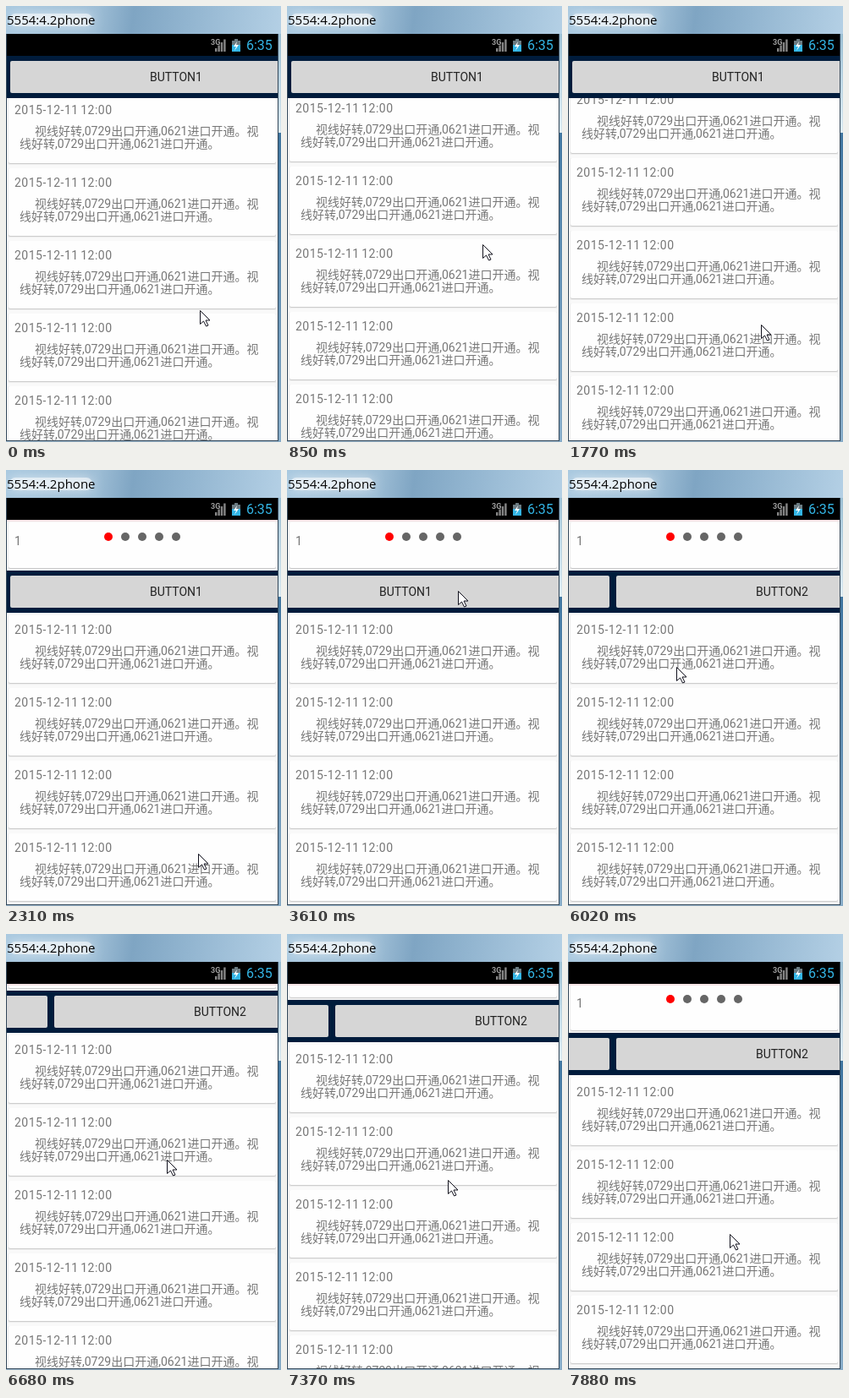
These frames come from a looping animation (325 px wide and 516 px high, 8 s). An HTML page with a canvas:

```html
<!DOCTYPE html>
<html lang="zh-CN">
<head>
<meta charset="utf-8">
<style>
  html, body { margin: 0; width: 100%; height: 100%; overflow: hidden; background: #9db8cc; }
  canvas { display: block; width: 325px; height: 516px; }
</style>
</head>
<body>
<canvas id="stage"></canvas>
<script>
const W = 325, H = 516, LOOP = 8000;
const canvas = document.getElementById('stage');
const ratio = window.devicePixelRatio || 1;
canvas.width = Math.round(W * ratio);
canvas.height = Math.round(H * ratio);
const ctx = canvas.getContext('2d');

const SANS = 'Roboto, "Noto Sans CJK SC", "Noto Sans CJK", sans-serif';
const BODY = '14px ' + SANS;
const TOP = 59, BOTTOM = 514, ROW = 86, HEADER = 60, BAR = 50;
const NOTE = '线好转,0729出口开通,0621进口开通。';

// Where the hand is and how far the list has scrolled at each turning point
const POSES = [
  { at: 150, x: 229, y: 360, scroll: 66 },
  { at: 1200, x: 231, y: 272, scroll: 165 },
  { at: 1770, x: 228, y: 377, scroll: 78 },
  { at: 2310, x: 227, y: 454, scroll: 0 },
  { at: 3250, x: 270, y: 143, scroll: 0 },
  { at: 4310, x: 69, y: 143, scroll: 0 },
  { at: 5800, x: 69, y: 143, scroll: 0 },
  { at: 6250, x: 190, y: 327, scroll: 0 },
  { at: 7050, x: 190, y: 251, scroll: 66 },
  { at: 7880, x: 191, y: 355, scroll: 2 }
];

const clamp = v => Math.min(1, Math.max(0, v));
const easeOut = p => 1 - (1 - p) ** 2;
const mix = (a, b, p) => Math.round(a + (b - a) * p);

// Upward flicks of the list slow down, everything else is an even drag
function poseAt(t) {
  const next = POSES.findIndex(p => p.at > t);
  const i = next < 0 ? POSES.length - 1 : Math.max(1, next);
  const a = POSES[i - 1], b = POSES[i];
  const p = clamp((t - a.at) / (b.at - a.at));
  const k = b.scroll > a.scroll ? easeOut(p) : p;
  return { x: mix(a.x, b.x, k), y: mix(a.y, b.y, k), scroll: mix(a.scroll, b.scroll, k) };
}

// Sideways drag, then a fling that slows to rest
function barScroll(t) {
  const grab = 3290, release = 4310, rest = 5280, dragged = 193, end = 348;
  return t < release
    ? mix(0, dragged, clamp((t - grab) / (release - grab)))
    : mix(dragged, end, easeOut(clamp((t - release) / (rest - release))));
}

function rect(x, y, w, h, color) {
  ctx.fillStyle = color;
  ctx.fillRect(x, y, w, h);
}

function roundRect(x, y, w, h, r, color) {
  ctx.fillStyle = color;
  ctx.beginPath();
  ctx.roundRect(x, y, w, h, r);
  ctx.fill();
}

function text(str, x, y, font, color, align = 'left') {
  ctx.font = font;
  ctx.fillStyle = color;
  ctx.textAlign = align;
  ctx.fillText(str, x, y);
}

function polygon(points, fill, stroke) {
  ctx.beginPath();
  points.forEach(([x, y]) => ctx.lineTo(x, y));
  ctx.closePath();
  ctx.fillStyle = fill;
  ctx.fill();
  if (stroke) {
    ctx.strokeStyle = stroke;
    ctx.lineWidth = 1;
    ctx.stroke();
  }
}

function gradient(x0, y0, x1, y1, ...stops) {
  const g = ctx.createLinearGradient(x0, y0, x1, y1);
  stops.forEach(([at, color]) => g.addColorStop(at, color));
  return g;
}

function drawWindow() {
  rect(0, 0, W, H, '#9db8cc');
  rect(321, 33, 4, 117, gradient(0, 33, 0, 150, [0, '#9cc0d4'], [1, '#dcebf2']));
  rect(321, 150, 4, 366, gradient(0, 150, 0, H, [0, '#3f759f'], [1, '#86abc7']));
  rect(0, 0, W, 33, gradient(0, 0, W, 40,
    [0, '#a8c8df'], [.33, '#9dbdd5'], [.46, '#7fa5c3'], [.66, '#92b5d0'], [1, '#b4d0e5']));

  ctx.save();
  ctx.shadowColor = '#fff';
  ctx.shadowBlur = 14 * ratio;
  roundRect(4, 9, 98, 15, 7, 'rgba(255,255,255,.55)');
  ctx.restore();
  text('5554:4.2phone', 1, 22, '15px "Open Sans", "Noto Sans", sans-serif', '#000');
  rect(0, 33, 322, 482, '#34485a');
}

function drawStatus() {
  rect(1, 33, 320, 26, '#000');
  for (let i = 0; i < 4; i++) rect(247 + i * 3.4, 50 - i * 3.5, 2.4, 4 + i * 3.5, '#858585');
  text('3G', 242, 46, 'bold 9px ' + SANS, '#a0a0a0');
  rect(270, 39, 4, 2, '#6b7b82');
  rect(267, 41, 10, 5, '#6b7b82');
  rect(267, 46, 10, 8, '#33b5e5');
  polygon([[273, 42], [269, 48], [272, 48], [270, 53], [275, 46], [272, 46]], '#fff');
  text('6:35', 284, 52, '16px ' + SANS, '#33b5e5');
}

function drawCard(y, h) {
  roundRect(2, y, 318, h + 2, 2, '#eee');
  roundRect(3, y + 2, 316, h - 1, 2, '#cdcdcd');
  roundRect(3, y, 316, h, 2, '#fefefe');
}

function drawHeader(y) {
  drawCard(y + 3, 54);
  text('1', 10, y + 30, BODY, '#777');
  for (let i = 0; i < 5; i++) {
    ctx.beginPath();
    ctx.arc(121 + i * 20, y + 20, 5, 0, Math.PI * 2);
    ctx.fillStyle = i ? '#666' : '#f00';
    ctx.fill();
  }
}

function drawRow(y) {
  drawCard(y + 3, 80);
  ctx.letterSpacing = '.5px';
  ctx.wordSpacing = '-1.5px';
  text('2015-12-11 12:00', 10, y + 25, BODY, '#777');
  ctx.letterSpacing = ctx.wordSpacing = '0px';
  text('视' + NOTE + '视', 34, y + 50, BODY, '#777');
  text(NOTE, 16, y + 65, BODY, '#777');
}

function drawBar(y, shift) {
  rect(1, y, 320, BAR, '#001c3c');
  for (let i = 0; i < 2; i++) {
    const x = 5 + i * 400 - shift;
    roundRect(x, y + 6, 392, 38, 2, '#d6d6d6');
    text('BUTTON' + (i + 1), x + 196, y + 30, BODY, '#222', 'center');
  }
}

function drawPointer(x, y) {
  const shape = [[0, 0], [0, 16], [4, 12.5], [7, 18.5], [9.5, 17.5], [6.5, 11.5], [11.5, 11.5]];
  polygon(shape.map(([px, py]) => [x + px + .5, y + py + .5]), '#fff', '#10101c');
}

function draw(t) {
  const { x, y, scroll } = poseAt(t);
  const headerY = TOP - scroll;
  ctx.setTransform(ratio, 0, 0, ratio, 0, 0);
  drawWindow();
  drawStatus();

  ctx.save();
  ctx.beginPath();
  ctx.rect(1, TOP, 320, BOTTOM - TOP);
  ctx.clip();
  rect(1, TOP, 320, BOTTOM - TOP, '#f9f9f9');
  drawHeader(headerY);
  for (let rowY = headerY + HEADER + BAR; rowY < BOTTOM; rowY += ROW) drawRow(rowY);
  if (scroll < HEADER) rect(1, TOP, 320, 2, '#f5e2e4');
  drawBar(Math.max(TOP, headerY + HEADER), barScroll(t));
  ctx.restore();

  drawPointer(x, y);
}

function tick() {
  draw(performance.now() % LOOP);
  requestAnimationFrame(tick);
}
tick();
</script>
</body>
</html>
```
